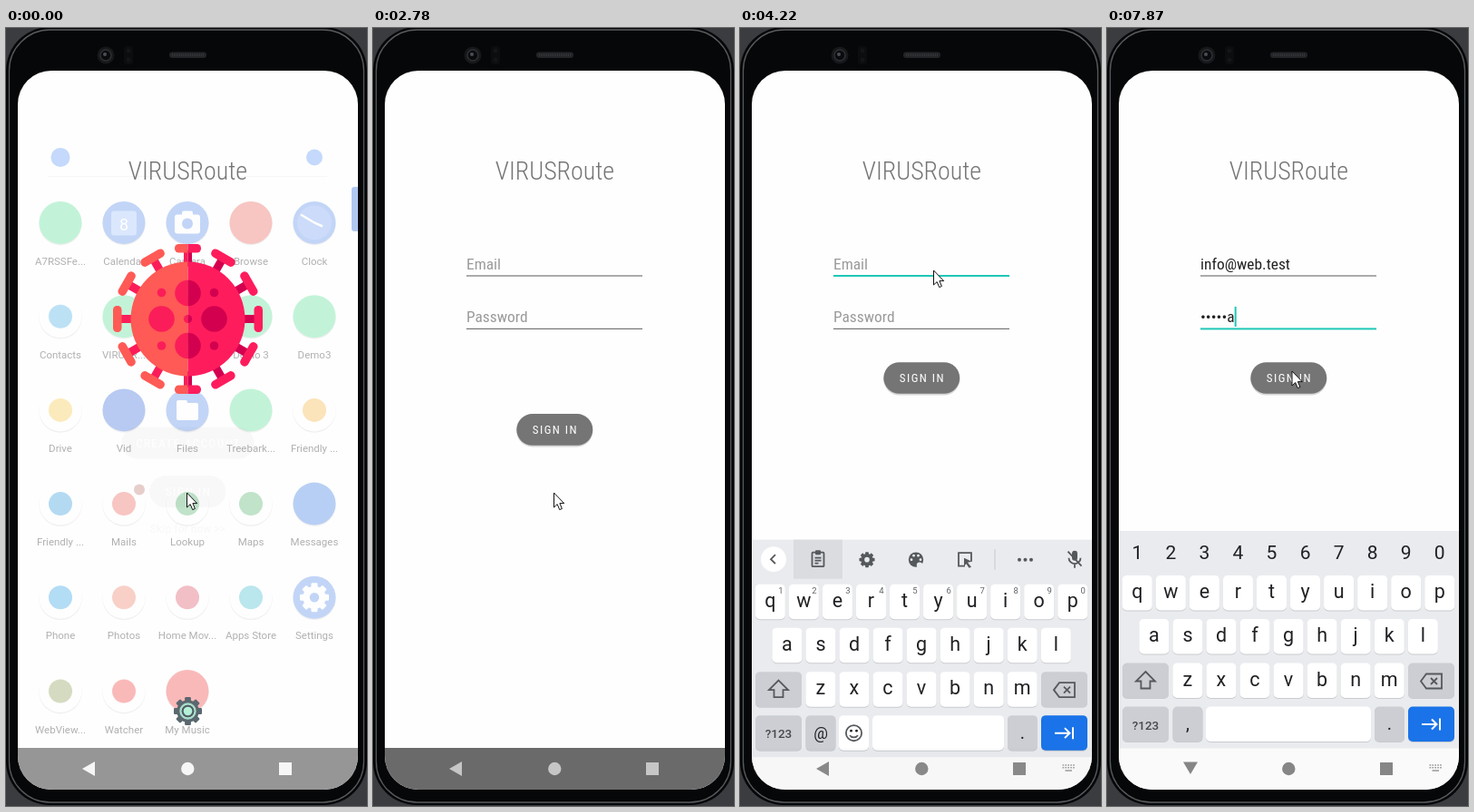
Animation, 398 px wide and 857 px high, one loop 8 s. Source, as an HTML page:

```html
<!DOCTYPE html>
<html lang="en">
<head>
<meta charset="utf-8">
<title>Sign in flow</title>
<style>
  html, body { margin: 0; width: 100%; height: 100%; overflow: hidden; background: #393b40; }
  svg { display: block; width: 398px; height: 857px; --tight: 0em; }
  text { font-family: Roboto, sans-serif; text-anchor: middle; white-space: pre; }
  .c { font-family: "Roboto Condensed", Roboto, sans-serif; font-stretch: 75%; letter-spacing: var(--tight); }
  .btn { letter-spacing: calc(var(--tight) + 1.45px); }
  .left { text-anchor: start; }
  .line { fill: none; stroke: #55585c; stroke-width: 1.8; }
</style>
</head>
<body>
<svg id="stage" viewBox="0 0 398 857"></svg>
<script>
const LOOP = 8000;
const TITLE = "VIRUSRoute", MAIL = "info@web.test";
const MAIL_KEYS = [4530, 4670, 4810, 4950, 5040, 5130, 5180, 5250, 5320, 5390, 5430, 5460, 5600];
const PASS_KEYS = [6210, 6350, 6490, 6620, 6760, 6900];
const MAIL_FOCUS = 3650, PASS_FOCUS = 5840;
const MAIL_Y = 259.6, PASS_Y = 318;
const TEAL = "#1fc7b6";

// Markup helpers
const rect = (x, y, w, h, r, fill, more = "") =>
  `<rect x="${x}" y="${y}" width="${w}" height="${h}" rx="${r}" fill="${fill}" ${more}/>`;
const circ = (x, y, r, fill, more = "") => `<circle cx="${x}" cy="${y}" r="${r}" fill="${fill}" ${more}/>`;
const text = (x, y, s, size, fill, more = "") =>
  `<text x="${x}" y="${y}" font-size="${size}" fill="${fill}" ${more}>${s}</text>`;
const path = (d, more = 'class="line"') => `<path d="${d}" ${more}/>`;
const group = (id, body, more = "") => `<g id="${id}" ${more}>${body}</g>`;
const repeat = (n, f) => Array.from({ length: n }, (_, i) => f(i)).join("");

function gear(x, y, r, fill) {
  return circ(x, y, r * .56, "none", `stroke="${fill}" stroke-width="${r * .46}"`) +
    repeat(8, i => rect(x - r * .22, y - r, r * .44, r * .35, r * .08, fill, `transform="rotate(${i * 45} ${x} ${y})"`));
}

function phone() {
  return rect(0, 0, 398, 857, 0, "#3b3c40") +
    rect(0, -1, 398, 857, 48, "#060708") +
    rect(3.5, 2, 391, 851, 45, "none", 'stroke="#595b5e" stroke-width="1.3"') +
    circ(110, 30, 9.5, "#17181a") + circ(110, 30, 6, "#0a0b0d", 'stroke="#2e3034" stroke-width="1.5"') +
    circ(109, 29, 2, "#4a4e55") +
    rect(130, 20, 10, 20, 3, "#0c0d0e") + circ(135, 25, 2.5, "#141517") + circ(135, 35, 2.5, "#141517") +
    rect(180, 26.5, 41, 6.5, 3, "#222427") + path("M183 29.8H218", 'stroke="#34363a" stroke-width="3" stroke-dasharray="1 1"');
}

// Home screen: label, disc colour, dot colour, glyph
const GREEN = "#3ddc84", BLUE = "#3b78e7", W = "#fff";
const APPS = [
  ["A7RSSFe...", GREEN], ["Calendar", BLUE, "", "8"], ["Camera", BLUE, "", "cam"], ["Browse", "#e8453c"], ["Clock", BLUE, "", "clock"],
  ["Contacts", W, "#2a9fe0"], ["VIRUSR...", GREEN], ["", GREEN], ["Demo 3", GREEN], ["Demo3", GREEN],
  ["Drive", W, "#f6bf26"], ["Vid", "#1a56d6"], ["Files", BLUE, "", "dir"], ["Treebark...", GREEN], ["Friendly ...", W, "#f5a623"],
  ["Friendly ...", W, "#0d8bd9"], ["Mails", W, "#e8453c"], ["Lookup", W, "#34a853"], ["Maps", W, "#34a853"], ["Messages", "#1a66e0"],
  ["Phone", W, "#0b8fe0"], ["Photos", W, "#ea6a4e"], ["Home Mov...", W, "#d8324a"], ["Apps Store", W, "#22b0c8"], ["Settings", BLUE, "", "gear"],
  ["WebView...", W, "#7a8c3a"], ["Watcher", W, "#f02020"], ["My Music", "#f02020"]
];
const GLYPHS = {
  "8": (x, y) => rect(x - 14, y - 13, 28, 27, 3, "#8db4f8") + text(x, y + 8, "8", 18, W),
  cam: (x, y) => rect(x - 14, y - 9, 28, 21, 3, W) + rect(x - 6, y - 13, 12, 6, 2, W) + circ(x, y + 1, 6, BLUE),
  clock: (x, y) => circ(x, y, 19, "#5b8def") + path(`M${x - 15} ${y - 9}L${x} ${y}L${x + 9} ${y + 4}`, 'fill="none" stroke="#fff" stroke-width="2.5"'),
  dir: (x, y) => rect(x - 12, y - 11, 12, 8, 2, W) + rect(x - 12, y - 8, 24, 19, 2, W),
  gear: (x, y) => gear(x, y, 16, W)
};
function home() {
  const icons = APPS.map(([label, disc, dot, glyph], i) => {
    const x = 60 + i % 5 * 70, row = Math.floor(i / 5), y = 214.5 + row * 103.2;
    return circ(x, y + 1.2, 23.7, "#000", 'opacity=".18"') + circ(x, y, 23.5, disc) +
      (dot ? circ(x, y, 13, dot) : "") + (glyph ? GLYPHS[glyph](x, y) : "") +
      text(x, 260.5 + row * 103.2, label, 11.5, "#000");
  }).join("");
  return path("M46 163.5H354", 'stroke="#e4e4e4"') + circ(60, 142.5, 10.5, "#4285f4") + circ(340, 142.5, 9, "#4285f4") +
    icons + circ(147, 508.5, 6, "#b0625a") + rect(381, 175, 9, 49, 3, "#0050d0");
}

// Virus: the same shape drawn twice, each half in its own colours
function virusHalf(side, main, deep) {
  const spike = i => `<g transform="rotate(${i * 30} 200.5 320.5)">` +
    rect(196, 245, 9, 18, 0, deep) + rect(186, 238, 29, 9.5, 4.5, main) + "</g>";
  const spots = [[200.5, 292, 14.3], [171.5, 320.5, 14.3], [229.5, 320.5, 14.3], [200.5, 350, 14.3], [200.5, 320.5, 4.6],
    [171.5, 291.5, 4.8], [229.5, 291.5, 4.8], [171.5, 350, 4.8], [229.5, 350, 4.8]];
  return `<g clip-path="url(#${side})">` + repeat(12, spike) + circ(200.5, 320.5, 63, main) +
    spots.map(([x, y, r]) => circ(x, y, r, deep)).join("") + "</g>";
}

function button(cx, cy, w, label) {
  return rect(cx - w / 2, cy - 16, w, 35, 17.3, "#000", 'opacity=".16"') +
    rect(cx - w / 2, cy - 17.3, w, 34.6, 17.3, "#757575") +
    text(cx + .6, cy + 4.8, label, 13, W, 'class="c btn"');
}

const settingsGear = gear(200.5, 752.5, 15.5, "#5a686f") + circ(200.5, 752.5, 8, "none", 'stroke="#a9dccb" stroke-width="2.4"') +
  circ(200.5, 752.5, 6.8, "#4f5c63") + circ(200.5, 752.5, 4.8, "#b4f0d8");

// Keyboard
const DARK = "#202124", GREY = "#ccced3";
const key = (x, y, w, fill = W) => rect(x, y + 1, w, 38.5, 5, "#c9cbcf") + rect(x, y, w, 38.5, 5, fill);
const row = (letters, x0, y) => [...letters].map((s, i) =>
  key(x0 + i * 37.05 - 16.5, y, 33) + text(x0 + i * 37.05, y + 25.2, s, 21.5, DARK)).join("");
const digits = (dx, y, size, fill) => repeat(10, i => text(33.3 + i * 37.05 + dx, y, (i + 1) % 10, size, fill));
const mic = rect(366, 566, 6, 11, 3, "#55585c") +
  path("M362.5 574a6.5 6.5 0 0 0 13 0M369 581v4M361.5 567L376.5 583");
const toggle = d => circ(37, 575.5, 14, W) + path(d);
const split = x => path(`M${x} 564.5V587`, 'stroke="#c6c8cc"');

function tools() {
  const ink = "#55585c";
  return rect(59, 554, 54, 43, 0, "#dadce0") + toggle("M39 570.5L34 575.5L39 580.5") +
    rect(79.5, 568, 13, 15.5, 1, "none", 'class="line"') + rect(83, 565.5, 6, 5, 1, ink) +
    path("M82.5 574h7M82.5 577h7M82.5 580h4") +
    gear(140, 576, 8.5, ink) + circ(194, 576, 8.2, ink) +
    [[189, 576], [191.5, 571.5], [196.5, 571.5], [199, 576]].map(([x, y]) => circ(x, y, 1.4, "#e9ebee")).join("") +
    circ(198, 582, 3.2, "#e9ebee") +
    path("M248 583H241V568.5H255V578") + path("M247 574L255.5 578L251 579L255 584L252.5 585L249.5 580.5L247 583Z", `fill="${ink}"`) +
    split(281) + [308, 314.5, 321].map(x => circ(x, 576, 2, ink)).join("") + mic;
}
function hints() {
  const pair = (x, a) => text(x, 569, a, 13, "#45484c", 'font-weight="500"') + text(x, 585, "@web.test", 12, "#45484c");
  return toggle("M35 570.5L40 575.5L35 580.5") + text(97, 583, "", 18, "#45484c", 'id="word"') +
    split(145) + pair(199, "info") + split(254) + pair(301, "info2") + mic;
}
function keyboard() {
  return rect(13, 554, 375, 290, 0, "#e9ebee") + rect(13, 793.5, 375, 46, 0, "#fafafa") +
    group("tools", tools()) + group("hints", hints()) + group("digits", digits(0, 584.5, 21, DARK)) +
    row("qwertyuiop", 33.3, 603) + group("sups", digits(11.5, 613.5, 9.5, "#5f6368")) +
    row("asdfghjkl", 51.9, 651) +
    key(17, 699.5, 51, GREY) + path("M42.5 709L53 719.5H47.5V727.5H37.5V719.5H32Z") +
    row("zxcvbnm", 88.9, 699.5) +
    key(332, 699.5, 51, GREY) + path("M346 719.5L352 711.5H369V727.5H352ZM357 716l7 7M364 716l-7 7") +
    key(17, 747.5, 51, GREY) + text(42.5, 772.5, "?123", 13.5, "#45484c", 'font-weight="500"') +
    key(72.5, 747.5, 33, GREY) +
    group("mailRow", text(89, 773.5, "@", 17.5, DARK) + key(109, 747.5, 33) + key(146, 747.5, 145) +
      circ(125.5, 767, 8.6, "none", 'class="line"') + circ(122.5, 764.5, 1.4, DARK) + circ(128.5, 764.5, 1.4, DARK) +
      path("M121 769.5a5 4 0 0 0 9 0")) +
    group("passRow", text(89, 773, ",", 20, DARK) + key(109, 747.5, 182)) +
    key(295, 747.5, 33, GREY) + text(311.5, 773, ".", 20, DARK) +
    key(332, 747.5, 51, "#1a73e8") +
    path("M347 767H363M358 761.5L363.5 767L358 772.5M367 760.5V773.5", 'fill="none" stroke="#fff" stroke-width="2"');
}

const field = (id, y, hint) =>
  rect(103, y + 13, 194, 1.2, 0, "#757575", `id="${id}Line"`) +
  text(103, y + 6.2, hint, 17.4, "#9a9a9a", `id="${id}" class="c left"`);

const stage = document.getElementById("stage");
stage.innerHTML = `<defs>
  <clipPath id="screen">${rect(13, 47, 375, 792, 37, W)}</clipPath>
  <clipPath id="west">${rect(100, 220, 100.5, 200, 0, W)}</clipPath>
  <clipPath id="east">${rect(200.5, 220, 100, 200, 0, W)}</clipPath></defs>` +
  phone() + `<g clip-path="url(#screen)">` + rect(13, 47, 375, 792, 0, "#fefefe") +
  group("home", home()) +
  text(200.5, 167.3, TITLE, 28, "#757575", 'id="title" class="c" font-weight="300"') +
  group("art", virusHalf("west", "#ff5a55", "#fb1d59") + virusHalf("east", "#ff1c5d", "#d3004f") + settingsGear) +
  group("extra", button(200.5, 457, 146, "CREATE ACCOUNT") +
    text(200.5, 556, "Skip for now &gt;&gt;", 13.7, "#757575", 'class="c"')) +
  group("form", field("mail", MAIL_Y, "Email") + field("pass", PASS_Y, "Password") + rect(0, 0, 2, 22, 0, TEAL, 'id="caret"')) +
  group("sign", button(200.3, 0, 84, "SIGN IN")) +
  rect(13, 793, 375, 47, 0, "#969696", 'id="bar"') +
  group("keys", keyboard()) + rect(13, 793, 375, 47, 0, "#000", 'id="tint"') +
  group("nav", path("M84 816L98 808V824Z", 'id="back"') + path("M84 808.5H100L92 822Z", 'id="down"') +
    path("M193.1 816a7.2 7.2 0 0 1 14.4 0a7.2 7.2 0 0 1 -14.4 0M301 809h14v14h-14Z", "")) +
  group("mini", path("M355.5 812H369M355.5 814.8H369", 'stroke="#999" stroke-width="1.5" stroke-dasharray="1.7 1.2"') +
    path("M358.5 818H366", 'stroke="#999" stroke-width="1.5"')) +
  "</g>" +
  group("mouse", path("M0 0V16L3.7 12.6L6.2 18.6L8.9 17.5L6.4 11.6H11.2Z", 'fill="#fff" stroke="#111" stroke-linejoin="round"')) +
  circ(0, 0, 12, "#fff800", 'id="glow" opacity=".5"');

const $ = Object.fromEntries([...stage.querySelectorAll("[id]")].map(e => [e.id, e]));
const set = (e, props) => { for (const k in props) e.setAttribute(k, props[k]); };
const show = (e, on) => set(e, { visibility: on ? "visible" : "hidden" });
const gray = v => `rgb(${Array(3).fill(Math.round(v))})`;

// Tighten the tracking where no condensed face exists
const slim = $.title.getComputedTextLength();
$.title.style.cssText = "font-family:Roboto,sans-serif;font-stretch:100%";
if (slim > $.title.getComputedTextLength() * .97) stage.style.setProperty("--tight", "-.055em");
$.title.style.cssText = "";

const clamp = u => Math.max(0, Math.min(1, u));
const span = (t, a, b) => clamp((t - a) / (b - a));
const inOut = u => u < .5 ? 2 * u * u : 1 - 2 * (1 - u) ** 2;
function track(t, steps) {
  let v = steps[0][1];
  for (let i = 1; i < steps.length; i++)
    v += (steps[i][1] - steps[i - 1][1]) * span(t, steps[i - 1][0], steps[i][0]);
  return v;
}
const count = (list, t) => list.filter(k => k <= t).length;

// Pointer moves: start, end, dx, dy
const MOVES = [[2850, 3330, -12, -247], [3850, 4030, 26, 2], [7370, 7870, -9.5, 111]];
const BEATS = [MAIL_FOCUS, ...MAIL_KEYS, PASS_FOCUS, ...PASS_KEYS];

function drawField(id, value, hint, focused, y) {
  if ($[id].textContent !== (value || hint)) $[id].textContent = value || hint;
  set($[id], { fill: value ? "#212121" : "#9a9a9a" });
  set($[id + "Line"], { fill: focused ? TEAL : "#757575", height: focused ? 2 : 1.2, y: y + (focused ? 12.4 : 12.8) });
  if (focused) set($.caret, { x: 103 + (value ? $[id].getComputedTextLength() : 0), y: y - 11 });
}

function draw(t) {
  const leave = track(t, [[2150, 1], [2590, .3], [2665, 0]]);
  const enter = span(t, 0, 600);
  const form = span(t, 2610, 2680);
  set($.home, { opacity: .31 * (1 - enter) });
  set($.art, { opacity: leave });
  set($.extra, { opacity: leave * (.04 + .96 * enter) });
  set($.form, { opacity: form });
  set($.sign, {
    opacity: .04 + .96 * enter,
    transform: `translate(0 ${510.5 - 125 * inOut(span(t, 2530, 3010))})`
  });

  const up = 1 - (1 - span(t, 3850, 4350)) ** 2.5;
  const bar = track(t, [[2150, 150], [2590, 107], [2730, 102], [3330, 150]]);
  const ink = (t < 1020 ? 246 : 216) - (150 - bar) * .4;
  set($.bar, { fill: gray(bar) });
  set($.keys, { transform: `translate(0 ${285 * (1 - up)})` });
  show($.keys, up > 0);
  set($.tint, { opacity: up > 0 ? .35 * (1 - up) : 0 });
  set($.nav, { fill: gray(ink + (134 - ink) * up) });
  set($.mini, { opacity: up });
  show($.back, t < 4250);
  show($.down, t >= 4250);

  const typed = count(MAIL_KEYS, t), masked = count(PASS_KEYS, t);
  const onPass = t >= PASS_FOCUS, onMail = t >= MAIL_FOCUS && !onPass;
  drawField("mail", MAIL.slice(0, typed), "Email", onMail, MAIL_Y);
  drawField("pass", masked ? "•".repeat(masked - 1) + "a" : "", "Password", onPass, PASS_Y);
  const beat = BEATS.filter(b => b <= t).pop();
  show($.caret, beat !== undefined && (t - beat) % 960 < 480);

  const vis = (id, on) => show($[id], on && up > 0);
  vis("tools", typed === 0);
  vis("hints", typed > 0 && !onPass);
  vis("digits", onPass);
  vis("sups", !onPass);
  vis("mailRow", !onPass);
  vis("passRow", onPass);
  $.word.textContent = MAIL.slice(0, Math.min(typed, 4));

  let x = 199.5, y = 512;
  for (const [a, b, dx, dy] of MOVES) {
    const u = inOut(span(t, a, b));
    x += dx * u;
    y += dy * u;
  }
  set($.mouse, { transform: `translate(${x} ${y})` });
  set($.glow, { cx: x + .5, cy: y });
  show($.glow, (t >= 1900 && t < 2050) || (t >= 3560 && t < 3690));
}

function tick() {
  draw(performance.now() % LOOP);
  requestAnimationFrame(tick);
}
tick();
</script>
</body>
</html>
```
